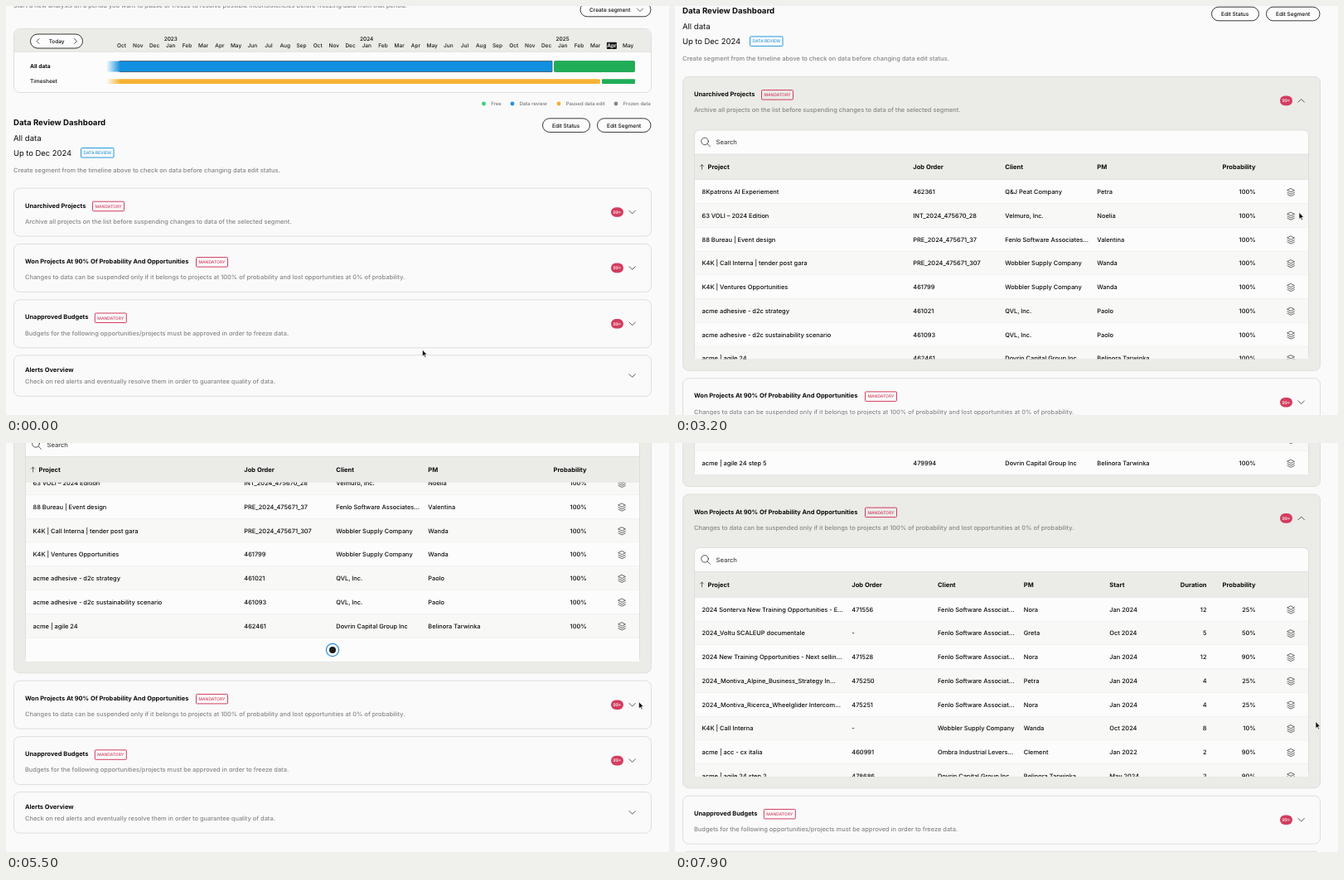
Write an HTML page that moves like this. It is 800 px wide and 494 px high and loops after 8000 ms.

```html
<!DOCTYPE html>
<html lang="en">
<head>
<meta charset="utf-8">
<title>Data review dashboard</title>
<style>
html, body { margin: 0; width: 100%; height: 100%; overflow: hidden; background: #fafafa; }
#stage { display: block; width: 800px; height: 494px; }
text { font-family: Inter, Roboto, sans-serif; text-rendering: geometricPrecision; white-space: pre; }
.line { fill: none; stroke: #333; stroke-width: .8; stroke-linecap: round; stroke-linejoin: round; }
</style>
</head>
<body>
<svg id="stage" viewBox="0 0 800 494" xmlns="http://www.w3.org/2000/svg"></svg>
<script>
const LOOP = 8000, GROW = 296.9, ROW = 28.75, BODY = 216.3;
const GREY = '#868686', RED = '#d33d5f', BLUE = '#118fe0', GREEN = '#1fae57', AMBER = '#f6b333';
const PANEL = '#ebebe7', EDGE = '#dededb';

const escape = s => String(s).replace(/&/g, '&amp;');
const text = (x, y, s, { size = 7.43, weight = 450, fill = '#0c0c0c', anchor = 'start' } = {}) =>
  `<text x="${x}" y="${y}" text-anchor="${anchor}" style="font-size:${size}px;font-weight:${weight};fill:${fill}">${escape(s)}</text>`;
const box = (x, y, w, h, fill, r = 0, stroke = 'none', sw = 1) =>
  `<rect x="${x}" y="${y}" width="${w}" height="${h}" rx="${r}" fill="${fill}" stroke="${stroke}" stroke-width="${sw}"/>`;
const dot = (x, y, r, fill, extra = '') => `<circle cx="${x}" cy="${y}" r="${r}" fill="${fill}" ${extra}/>`;
const line = (d, extra = '') => `<path class="line" d="${d}" ${extra}/>`;
const rule = (x1, x2, y, color = EDGE) => line(`M${x1} ${y}H${x2}`, `style="stroke:${color}"`);
const pill = (x, y, w, label, labelX) =>
  box(x, y, w, 16.6, '#fcfcfc', 8.3, '#222', .9) + text(labelX, y + 10.7, label, { size: 6.5, weight: 500 });
const tag = (x, y, w, label, color) =>
  box(x, y, w, 11.5, 'none', 1, color, 1) + text(x + w / 2, y + 7.6, label, { size: 5, fill: color, anchor: 'middle' });

function timeline() {
  const months = 'Jan Feb Mar Apr May Jun Jul Aug Sep Oct Nov Dec'.split(' ');
  let out = box(9.5, 27.5, 769, 77, '#fcfcfc', 7, EDGE)
    + `<path d="M10 55V34.500q0-6.500 6.500-6.500H771.500q6.500 0 6.500 6.500V55z" fill="${PANEL}"/>` + rule(10, 778, 55.3)
    + box(29.5, 34, 63, 17, '#fcfcfc', 8.5, '#222', .9)
    + line('M40 39.500l-3 3 3 3M82.500 39.500l3 3-3 3')
    + text(61, 45, 'Today', { size: 6.4, weight: 500, anchor: 'middle' });
  [2023, 2024, 2025].forEach((year, i) => out += text(198.8 + i * 236.4, 41.6, year, { size: 6.5, anchor: 'middle' }));
  for (let i = 0; i < 32; i++) {
    const x = 139.6 + i * 19.71, current = i === 30;
    if (current) out += box(x - 6, 43.7, 12, 8.3, '#151515', 1);
    out += text(x, 50.1, months[(i + 9) % 12], { size: 6.5, anchor: 'middle', weight: current ? 600 : 450, fill: current ? '#fff' : '#1a1a1a' });
  }
  out += text(29, 75.3, 'All data', { size: 6.7, weight: 700 }) + text(29, 93.3, 'Timesheet', { size: 6.5 })
    + box(121, 66.5, 538, 13, 'url(#fadeBlue)') + line('M137 66.500H659V79.500H137', 'style="stroke:#4a6070;stroke-width:.9"')
    + box(661.5, 66.5, 97, 13, GREEN, 1, '#1a9b4c', .8)
    + box(121, 88.2, 596, 5.8, 'url(#fadeAmber)', 2) + box(719, 88.2, 40, 5.8, GREEN, 1);
  [[576.5, 'Free', '#39cf78'], [611, 'Data review', '#2490e6'], [667, 'Paused data edit', '#f6ad32'], [736, 'Frozen data', '#858585']]
    .forEach(([x, label, color]) => out += dot(x, 118, 2.4, color) + text(x + 8.7, 120.1, label, { size: 5.9, fill: '#777' }));
  return out;
}

const heading = () =>
  text(9, 1.8, 'Start a new analysis on a period you want to pause or freeze to resolve possible inconsistencies before freezing data from that period.', { fill: GREY })
  + pill(693, -3.8, 85, 'Create segment', 704) + line('M761.500 3l3.500 3.500 3.500-3.500')
  + timeline()
  + text(9, 144, 'Data Review Dashboard', { size: 9.6, weight: 700 })
  + pill(647.5, 135.8, 57, 'Edit Status', 659) + pill(713.5, 135.8, 64.5, 'Edit Segment', 725)
  + text(9, 163, 'All data', { size: 9.5, weight: 400 }) + text(9, 180.6, 'Up to Dec 2024', { size: 9.4, weight: 400 })
  + tag(90.5, 171.5, 39.5, 'DATA REVIEW', '#2798df')
  + text(9, 200.5, 'Create segment from the timeline above to check on data before changing data edit status.', { fill: GREY });

const layers = y => line(`M743.200 ${y - 4.5}l4.200 2.100-4.200 2.100-4.200-2.100zM739 ${y + .1}l4.200 2.100 4.200-2.100M739 ${y + 2.5}l4.200 2.100 4.200-2.100`, 'style="stroke-width:.75"');

// A column is [x, title, anchor]
function row(cols, values, i) {
  const y = i * ROW;
  return box(24, y, 740, ROW, i % 2 ? '#f8f8f7' : '#fcfcfc') + rule(24, 764, y + ROW, '#e6e6e3')
    + values.map((v, k) => text(cols[k][0], y + 17.1, v, { anchor: cols[k][2] })).join('')
    + layers(y + 14.9);
}

const table = (id, cols, rows) =>
  box(23.5, 64.5, 741, 276.5, '#fcfcfc', 6, EDGE)
  + dot(36, 78, 4.3, 'none', 'class="line"') + line('M39.200 81.200l3.300 3.300') + text(49.5, 81.8, 'Search', { size: 7.55, fill: '#444' })
  + box(24, 93.6, 740, 31, PANEL) + rule(24, 764, 93.6) + rule(24, 764, 124.5)
  + line('M32.500 112V106.200M30.500 108.200l2-2 2 2', 'style="stroke-width:.7"')
  + cols.map(([x, s, a], k) => text(k ? x : 39.5, 111.8, s, { size: 7.55, weight: 700, anchor: a })).join('')
  + `<svg x="0" y="124.7" width="764" height="${BODY}" overflow="hidden"><g id="${id}">`
  + rows.map((r, i) => row(cols, r, i)).join('') + '</g>'
  + `<g id="${id}Bar">${box(755, 0, 9, BODY, '#f1f1ef')}<rect id="${id}Thumb" x="757" width="6" height="178" rx="2.5" fill="#6d6d6d"/></g></svg>`;

const MAIN = 'Fenlo Software Associa';
const DOVRIN = 'Dovrin Capital Group Inc', PERSON = 'Belinora Tarwinka', WOBBLER = 'Wobbler Supply Company';
const cols1 = [[32.5, 'Project'], [287.3, 'Job Order'], [398.3, 'Client'], [509.3, 'PM'], [700.6, 'Probability', 'end']];
const rows1 = [
  ['8Kpatrons AI Experiement', '462361', 'Q&J Peat Company', 'Petra'],
  ['63 VOLI – 2024 Edition', 'INT_2024_475670_28', 'Velmuro, Inc.', 'Noelia'],
  ['88 Bureau | Event design', 'PRE_2024_475671_37', MAIN + 'tes…', 'Valentina'],
  ['K4K | Call Interna | tender post gara', 'PRE_2024_475671_307', WOBBLER, 'Wanda'],
  ['K4K | Ventures Opportunities', '461799', WOBBLER, 'Wanda'],
  ['acme adhesive - d2c strategy', '461021', 'QVL, Inc.', 'Paolo'],
  ['acme adhesive - d2c sustainability scenario', '461093', 'QVL, Inc.', 'Paolo'],
  ['acme | agile 24', '462461', DOVRIN, PERSON],
].map(r => [...r, '100%']);
const cols2 = [[32.5, 'Project'], [213.3, 'Job Order'], [317, 'Client'], [420.8, 'PM'], [524.3, 'Start'], [641.5, 'Duration', 'end'], [700.6, 'Probability', 'end']];
const rows2 = [
  ['2024 Sonterva New Training Opportunities - E…', '471556', MAIN + 't…', 'Nora', 'Jan 2024', 12, '25%'],
  ['2024_Voltu SCALEUP documentale', '-', MAIN + 't…', 'Greta', 'Oct 2024', 5, '50%'],
  ['2024 New Training Opportunities - Next sellin…', '471528', MAIN + 't…', 'Nora', 'Jan 2024', 12, '90%'],
  ['2024_Montiva_Alpine_Business_Strategy In…', '475250', MAIN + 't…', 'Petra', 'Jan 2024', 4, '25%'],
  ['2024_Montiva_Ricerca_Wheelglider Intercom…', '475251', MAIN + 't…', 'Nora', 'Jan 2024', 4, '25%'],
  ['K4K | Call Interna', '-', WOBBLER, 'Wanda', 'Oct 2024', 8, '10%'],
  ['acme | acc - cx italia', '460991', 'Ombra Industrial Levers…', 'Clement', 'Jan 2022', 2, '90%'],
  ['acme | agile 24 step 2', '478686', DOVRIN, PERSON, 'May 2024', 2, '90%'],
];

function card(id, height, title, note, tagX, content = '') {
  const short = !tagX;
  return `<g id="${id}"><rect id="${id}Box" x="9.5" y="0" width="769" height="${height}" rx="7" stroke="${EDGE}"/>`
    + text(23, short ? 20.2 : 23.7, title, { size: 7.45, weight: 700 })
    + text(23, short ? 34.5 : 42.9, note, { fill: GREY })
    + (short ? '' : tag(tagX, 16.2, 38, 'MANDATORY', RED)
      + box(730, 23.2, 15, 11.6, RED, 5.8) + text(737.5, 30.9, '99+', { size: 5.2, weight: 500, fill: '#fff', anchor: 'middle' }))
    + `<g transform="translate(755.700 ${short ? 24.7 : 29})"><g id="${id}Arrow">${line('M-3.700-1.800L0 1.900 3.700-1.800')}</g></g>`
    + (content && `<svg id="${id}Clip" x="0" y="0" width="800" height="0" overflow="hidden">${content}</svg>`) + '</g>';
}

const fade = (id, color) => `<linearGradient id="${id}" gradientUnits="userSpaceOnUse" x1="121" x2="138" y1="0" y2="0"><stop stop-color="${color}" stop-opacity="0"/><stop offset="1" stop-color="${color}"/></linearGradient>`;

const stage = document.getElementById('stage');
stage.innerHTML = `<defs>${fade('fadeBlue', BLUE)}${fade('fadeAmber', AMBER)}</defs>`
  + box(0, 0, 800, 494, '#fafafa')
  + `<g id="page">${heading()}`
  + card('archive', 58, 'Unarchived Projects', 'Archive all projects on the list before suspending changes to data of the selected segment.', 104.5, table('first', cols1, rows1))
  + card('won', 58, 'Won Projects At 90% Of Probability And Opportunities', 'Changes to data can be suspended only if it belongs to projects at 100% of probability and lost opportunities at 0% of probability.', 229.5, table('second', cols2, rows2))
  + card('budgets', 58, 'Unapproved Budgets', 'Budgets for the following opportunities/projects must be approved in order to freeze data.', 107.3)
  + card('alerts', 49.5, 'Alerts Overview', 'Check on red alerts and eventually resolve them in order to guarantee quality of data.')
  + '</g><path id="cursor" d="M0 0V8.300L1.900 6.600 3.200 9.500 4.500 8.900 3.200 6.100H5.700z" fill="#0a0a0a" stroke="#fff" stroke-width=".7"/>';

const $ = id => document.getElementById(id);
const end = 8 * ROW;
$('first').insertAdjacentHTML('beforeend',
  `<g id="spinner">${box(24, end + .4, 740, ROW, '#fcfcfc')}${dot(394, end + 14.8, 7.6, '#fff', 'stroke="#2f8fd8" stroke-width="1.3"')}${dot(394, end + 14.8, 4, '#1c1c1c')}</g>`
  + `<g id="loaded">${row(cols1, ['acme | agile 24 step 5', '479994', DOVRIN, PERSON, '100%'], 8)}</g>`);

const clamp = u => Math.max(0, Math.min(1, u));
const ease = (t, from, to) => { const u = clamp((t - from) / (to - from)); return u * u * (3 - 2 * u); };
const easeOut = (t, from, to) => 1 - (1 - clamp((t - from) / (to - from))) ** 3;
const move = (id, x, y) => $(id).setAttribute('transform', `translate(${x} ${y})`);
const show = (id, on) => $(id).setAttribute('visibility', on ? 'visible' : 'hidden');

// Stops of [time, x, y]
const cursorPath = [[50, 502.4, 415], [850, 786, 252], [1250, 753, 249.2], [3900, 753, 249.2], [4350, 779, 259.3],
  [4850, 779, 259.3], [5400, 763.6, 312.5], [6000, 763.6, 312.5], [6400, 760.5, 315], [6900, 760.5, 315], [7500, 773, 336.4]];
function cursorAt(t) {
  let [, x, y] = cursorPath[0];
  for (let i = 1; i < cursorPath.length; i++) {
    const [from, ax, ay] = cursorPath[i - 1], [to, bx, by] = cursorPath[i], u = ease(t, from, to);
    x += (bx - ax) * u;
    y += (by - ay) * u;
  }
  return [x, y];
}

function setCard(id, y, open) {
  move(id, 0, y);
  $(id + 'Box').setAttribute('fill', open > .02 ? PANEL : '#fafafa');
  if (!$(id + 'Clip')) return;
  const height = 58 + GROW * open;
  $(id + 'Box').setAttribute('height', height);
  $(id + 'Clip').setAttribute('height', open ? height : 0);
  show(id + 'Clip', open > 0);
  $(id + 'Arrow').setAttribute('transform', `rotate(${180 * clamp(open * 1.5)})`);
}

function draw(t) {
  const open1 = easeOut(t, 1795, 2200), open2 = easeOut(t, 5800, 6200);
  const scroll = 134.6 * ease(t, 2750, 3200) + 162.5 * ease(t, 4400, 5101) + 225.3 * ease(t, 6200, 7507);
  const inner = ease(t, 3350, 3850);
  move('page', 0, -scroll);
  setCard('archive', 220, open1);
  setCard('won', 287.4 + GROW * open1, open2);
  const shift = GROW * (open1 + open2);
  setCard('budgets', 354.8 + shift, 0);
  setCard('alerts', 421.8 + shift, 0);

  move('first', 0, -42.4 * inner);
  $('firstThumb').setAttribute('y', 1 + 35.5 * inner);
  show('firstBar', t > 3350 && t < 5000);
  show('secondBar', false);
  const loaded = t > 7000;
  $('spinner').style.display = loaded ? 'none' : '';
  $('loaded').style.display = loaded ? '' : 'none';
  move('cursor', ...cursorAt(t));
}

const start = performance.now();
function tick() {
  draw((performance.now() - start) % LOOP);
  requestAnimationFrame(tick);
}
draw(0);
requestAnimationFrame(tick);
</script>
</body>
</html>
```
